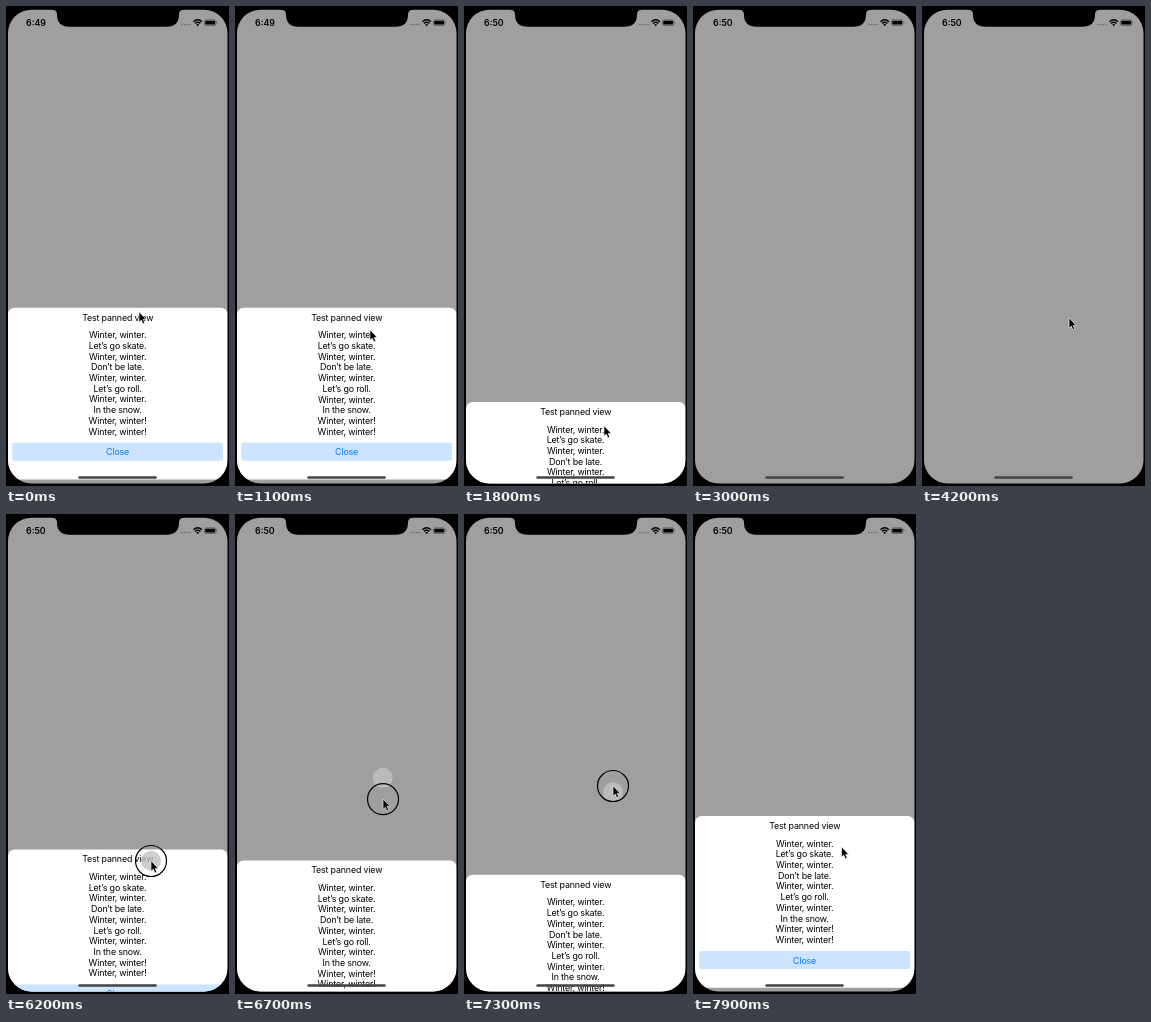
Recreate the animation shown at these times as an HTML page. Size 223x480 px, loop 8000 ms.

```html
<!DOCTYPE html>
<html lang="en">
<head>
<meta charset="utf-8">
<title>Panned sheet</title>
<style>
  html, body { margin: 0; width: 100%; height: 100%; overflow: hidden; background: #000; }
  svg { display: block; width: 100%; height: 100%; }
  text { font: 8.9px Inter, "Liberation Sans", sans-serif; letter-spacing: -.17px; }
  #sheet text { text-anchor: middle; }
  #clock { font-size: 8.8px; font-weight: 600; letter-spacing: 0; }
</style>
</head>
<body>
<svg viewBox="0 0 223 480">
  <defs>
    <clipPath id="screen"><rect x="2" y="3.7" width="219.500" height="473.800" rx="23.500"/></clipPath>
  </defs>
  <rect width="223" height="480"/>
  <g clip-path="url(#screen)">
    <rect width="223" height="480" fill="#9f9f9f"/>
    <g id="sheet">
      <rect x="2" width="219.500" height="171.700" rx="6.500" fill="#fff"/>
      <text x="111.700" y="13">Test panned view</text>
      <g id="lines"></g>
      <rect x="6.300" y="135" width="210.700" height="18" rx="2" fill="#cce4ff"/>
      <text x="111.600" y="147.500" fill="#007aff">Close</text>
    </g>
    <rect x="72.300" y="470.300" width="78.500" height="2.500" rx="1.250" fill="#444"/>
  </g>

  <!-- notch and status bar -->
  <path d="M46 3H178V3.700Q173 3.700 173 8.500Q173 20.700 160.500 20.700H63.500Q51 20.700 51 8.500Q51 3.700 46 3.700Z"/>
  <text id="clock" x="20" y="20"></text>
  <g id="signal" fill="#666"></g>
  <path d="M187.400 15.700Q191.700 11.900 196 15.700M189 17.500Q191.700 15.100 194.400 17.500" fill="none" stroke="#000" stroke-width="1.400"/>
  <path d="M190.200 18.600Q191.700 17.400 193.200 18.600L191.700 20.200Z"/>
  <rect x="198.400" y="13.800" width="11.600" height="5.700" rx="1.700" fill="none" stroke="#444" stroke-width=".6"/>
  <rect x="199.300" y="14.700" width="9.800" height="3.900" rx=".9"/>
  <path d="M210.800 15.600Q212 16.600 210.800 17.700Z" fill="#444"/>

  <circle id="dot" r="10" fill="#c2c2c2" fill-opacity=".8"/>
  <g id="cursor">
    <circle id="ring" r="15.500" fill="none" stroke="#000" stroke-width="1.200"/>
    <path d="M0 -.3V10.200L2.300 8.100 3.900 11.800 5.700 11 4.100 7.400H7.200Z" stroke="#fff" stroke-width=".6"/>
  </g>
</svg>
<script>
  const LOOP = 8000, STEP = 100;
  const REST = 301.7, CLOSED = 182;   // top edge when open, offset when gone
  const TOUCH_LAG = 44, OPEN_AT = 4370;
  const el = id => document.getElementById(id);

  const w = "Winter, winter.", end = "Winter, winter!";
  const verse = [w, "Let’s go skate.", w, "Don’t be late.", w, "Let’s go roll.", w, "In the snow.", end, end];
  el("lines").innerHTML = verse.map((line, i) =>
    `<text x="111.600" y="${(30.6 + i * 10.7).toFixed(2)}">${line}</text>`).join("");
  el("signal").innerHTML = [0, 1, 2, 3].map(i =>
    `<circle cx="${176 + i * 2.7}" cy="18.500" r=".8"/>`).join("");

  // Eased pointer strokes: start, end, then where it arrives
  const home = [133, 306];
  const strokes = [
    [100, 400, 135, 342], [700, 1200, 135, 322],
    [1420, 1800, 140, 420], [1800, 2200, 152, 310],
    [2800, 2950, 180, 285], [3950, 4200, 147, 312],
    [5200, 5600, 122, 421], [5600, 6080, 145, 313],
    [6080, 6160, 145, 347], [6200, 6500, 147, 219], [6500, 6893, 149, 348],
    [7050, 7300, 149, 272], [7400, 7600, 149, 237], [7600, 7900, 148.5, 333]
  ];
  const drags = [{ down: 100, up: 700 }, { down: 1400, up: 1800 }, { down: 6080, up: 7600 }];

  const progress = (t, from, to) => Math.min(1, Math.max(0, (t - from) / (to - from)));
  const smooth = p => p * p * (3 - 2 * p);

  function pointer(t) {
    let [x, y] = home;
    for (const [from, to, toX, toY] of strokes) {
      const p = smooth(progress(t, from, to));
      x += (toX - x) * p;
      y += (toY - y) * p;
    }
    return [x, y];
  }

  const touch = t => pointer(t - TOUCH_LAG);

  // The sheet follows each touch movement but never rises above its rest
  function dragged({ down, up }, t) {
    let offset = 0, last = touch(down)[1];
    for (let s = down; s <= Math.min(t, up); s += 10) {
      const y = touch(s)[1];
      offset = Math.max(0, offset + y - last);
      last = y;
    }
    return offset;
  }

  // Underdamped spring that opens the sheet
  function opening(ms) {
    const a = 9 * ms / 1000, k = 0.65;
    return 178 * Math.exp(-k * a) * (Math.cos(a) + k * Math.sin(a));
  }

  function sheetOffset(t) {
    const drag = drags.filter(d => d.down <= t).pop();
    if (!drag) return 0;
    if (t >= OPEN_AT && drag.up < OPEN_AT) return opening(t - OPEN_AT);
    const offset = dragged(drag, t), since = t - drag.up;
    if (since <= 0) return offset;
    if (offset > CLOSED / 2) return offset + (CLOSED - offset) * (1 - (1 - progress(since, 0, 400)) ** 2);
    const a = since / 50;
    return offset * (1 + a) * Math.exp(-a);
  }

  const move = (id, x, y) => el(id).setAttribute("transform", `translate(${x} ${y})`);
  const show = (id, on) => el(id).setAttribute("visibility", on ? "visible" : "hidden");

  function draw(now) {
    const t = Math.floor((now % LOOP) / STEP) * STEP;
    const pressed = drags.some(d => t >= d.down && t < d.up);

    move("sheet", 0, REST + sheetOffset(t));
    move("cursor", ...pointer(t));
    move("dot", ...touch(t));
    show("cursor", t < 3000 || t >= 4000);
    show("ring", pressed);
    show("dot", pressed);
    // a visible child would ignore its hidden parent, but no drag overlaps that gap
    el("clock").textContent = t < 1300 ? "6:49" : "6:50";
  }

  const start = performance.now();
  function frame() {
    draw(performance.now() - start);
    requestAnimationFrame(frame);
  }
  frame();
</script>
</body>
</html>
```
